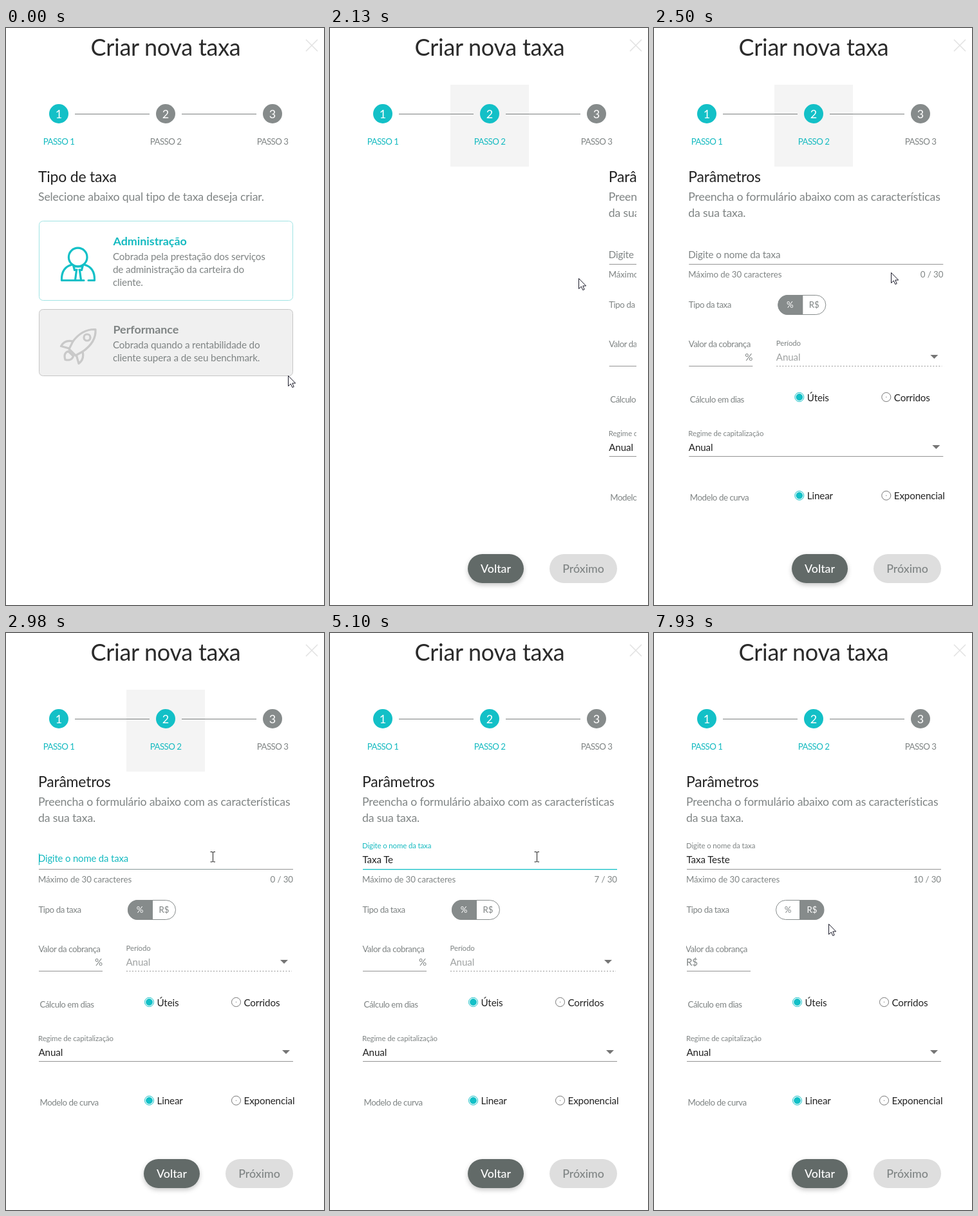
An HTML page for the animation above (8000 ms loop, 494 px wide and 895 px high).

```html
<!DOCTYPE html>
<html lang="pt-BR">
<head>
<meta charset="utf-8">
<title>Criar nova taxa</title>
<style>
  html, body { margin: 0; width: 100%; height: 100%; overflow: hidden; background: #fff; }
  svg { display: block; font-family: Lato, sans-serif; }
  text { white-space: pre; fill: #7f8484; font-size: 15.2px; letter-spacing: -.14px; }
  .title { font-size: 36px; letter-spacing: -.28px; fill: #2b2b2b; }
  .head { font-size: 23px; letter-spacing: -.22px; fill: #222; }
  .sub { font-size: 17.7px; letter-spacing: -.16px; }
  .small { font-size: 13.3px; letter-spacing: -.08px; }
  .tight { font-size: 13.3px; letter-spacing: -.45px; }
  .tiny { font-size: 11.4px; letter-spacing: -.08px; }
  .step { font-size: 13.3px; letter-spacing: -.55px; }
  .num { font-size: 18px; letter-spacing: 0; fill: #fff; }
  .dark { fill: #222; }
  .pale { fill: #a0a3a3; }
  .card { font-size: 17.9px; font-weight: 700; letter-spacing: -.04px; }
  .btn { font-size: 17.8px; font-weight: 500; letter-spacing: 0; }
  .mid { text-anchor: middle; }
  .end { text-anchor: end; }
  .teal { fill: #14bac0; }
  .white { fill: #fff; }
  .icon { fill: none; stroke-width: 3.2; stroke-linecap: round; stroke-linejoin: round; }
</style>
</head>
<body>
<svg id="stage" width="494" height="895" viewBox="0 0 494 895">
  <defs>
    <clipPath id="page"><rect x="50" y="200" width="426" height="600"/></clipPath>
    <filter id="shadow" x="-20%" y="-20%" width="140%" height="170%">
      <feDropShadow dx="0" dy="3" stdDeviation="3.5" flood-opacity=".22"/>
    </filter>
  </defs>
</svg>
<script>
const NS = 'http://www.w3.org/2000/svg';
const TEAL = '#13c0c7', GRAY = '#868b8b', LOOP = 8000, LEFT = 50;
const stage = document.getElementById('stage');

function el(parent, tag, attrs = {}, content = '') {
  const node = document.createElementNS(NS, tag);
  for (const k in attrs) node.setAttribute(k, attrs[k]);
  node.textContent = content;
  return parent.appendChild(node);
}
const group = (parent, attrs) => el(parent, 'g', attrs);
const text = (p, x, y, cls, s) => el(p, 'text', { x, y, class: cls }, s);
const rect = (p, x, y, width, height, fill, more) => el(p, 'rect', { x, y, width, height, fill, ...more });
const circle = (p, cx, cy, r, fill, more) => el(p, 'circle', { cx, cy, r, fill, ...more });
const path = (p, d, attrs) => el(p, 'path', { d, ...attrs });
const show = (node, on) => node.setAttribute('visibility', on ? 'visible' : 'hidden');
const fade = (node, v) => node.setAttribute('opacity', v);

// Header and stepper
text(stage, 248, 43, 'title mid', 'Criar nova taxa');
path(stage, 'M466 18L484 36M484 18L466 36', { stroke: '#e2e2e2', 'stroke-width': 1.6 });
const glow = rect(stage, 187, 88, 122, 127, '#f4f4f4');
for (const x of [107, 273]) rect(stage, x, 133, 116, 1, '#7c8080');
const steps = [82, 248, 414].map((x, i) => {
  const dot = circle(stage, x, 133, 15, GRAY);
  text(stage, x, 139.5, 'num mid', i + 1);
  return { dot, label: text(stage, x, 181, 'step mid', 'PASSO ' + (i + 1)) };
});
function lightStep(i, on) {
  steps[i].dot.setAttribute('fill', on ? TEAL : GRAY);
  steps[i].label.setAttribute('class', 'step mid' + (on ? ' teal' : ''));
}
lightStep(0, true);

// First page: fee type cards
const first = group(stage);
text(first, LEFT, 239, 'head', 'Tipo de taxa');
text(first, LEFT, 268, 'sub', 'Selecione abaixo qual tipo de taxa deseja criar.');
function card(y, h, fill, stroke, cls, name, lines) {
  rect(first, 51.5, y + .5, 394, h, fill, { rx: 6, stroke });
  text(first, 166.5, y + 38, 'card ' + cls, name);
  lines.forEach((s, i) => text(first, 166, y + 61 + i * 20, '', s));
}
card(299, 123, '#fff', '#a0e4e4', 'teal', 'Administração',
  ['Cobrada pela prestação dos serviços', 'de administração da carteira do', 'cliente.']);
card(436, 103, '#f0f0f0', '#c6c6c6', '', 'Performance',
  ['Cobrada quando a rentabilidade do', 'cliente supera a de seu benchmark.']);

const person = group(first, { class: 'icon', stroke: TEAL });
circle(person, 111.7, 355.5, 14.3, 'none');
path(person, 'M121 391.500H86.500C86 378 92 369.500 103 367M121 367C132 369.500 138 378 137.500 391.500H128');
path(person, 'M104.500 368L106.500 375.500L110 375M119.500 368L117.500 375.500L114 375M107 370H117M109.500 376L107.500 391M114.500 376L116.500 391');
const rocket = group(first, { class: 'icon', stroke: '#c9c9c9' });
path(rocket, 'M139 467.500C124 467 113 474 104 486L98 498L108 508L119 502C132 493 140 482 139 467.500Z');
path(rocket, 'M104 486C95 484 89 487 85.500 493.500L98 497M119 502C121 510 119 516 113 520.500L109.500 508');
path(rocket, 'M97 501.500C91 503 90 508 92 514.500C98 516 103 514 104.500 509Z');
circle(rocket, 126, 480, 5, 'none');

// Second page: form
const second = group(stage, { 'clip-path': 'url(#page)' });
const form = group(second);
text(form, LEFT, 239, 'head', 'Parâmetros');
text(form, LEFT, 268, 'sub', 'Preencha o formulário abaixo com as características');
text(form, LEFT, 293, 'sub', 'da sua taxa.');

const line = (p, x, y, w) => rect(p, x, y, w, 1, '#949494');
const arrowDown = (p, x, y) => path(p, `M${x - 6} ${y}h12l-6 6z`, { fill: '#757575' });

const label = text(form, 0, 0, '', 'Digite o nome da taxa');
const value = text(form, 50.5, 357, 'dark', '');
const caret = rect(form, 51, 342, 1, 18, '#13b6bd');
line(form, 51, 366, 395);
const focusLine = rect(form, 51, 366, 395, 1.3, TEAL);
text(form, LEFT, 387, 'small', 'Máximo de 30 caracteres');
const counter = text(form, 446, 387, 'small end', '');

text(form, 50.5, 434, 'tight', 'Tipo da taxa');
const picked = path(form, '', { fill: GRAY });
rect(form, 189.5, 414.5, 74, 30, 'none', { rx: 15, stroke: GRAY });
const percentTab = text(form, 208, 434, '', '%');
const moneyTab = text(form, 245.5, 434, '', 'R$');

const amountLabel = text(form, 50.5, 495, 'tight', 'Valor da cobrança');
const percent = text(form, 150, 516, 'end', '%');
const money = text(form, LEFT, 516, '', 'R$');
line(form, 51, 524, 99);
const period = group(form);
text(period, 186.5, 493, 'tiny', 'Período');
text(period, 186.5, 516, 'pale', 'Anual');
arrowDown(period, 432, 507);
path(period, 'M187 524.500H444', { stroke: '#969696', 'stroke-dasharray': '2 2.500' });

function radios(y, caption, a, b) {
  text(form, 52.5, y + 8, 'tight', caption);
  circle(form, 222.5, y, 7, '#fff', { stroke: TEAL });
  circle(form, 222.5, y, 5.4, TEAL);
  text(form, 234.5, y + 6, 'dark', a);
  circle(form, 357.5, y, 7, '#fff', { stroke: '#777' });
  circle(form, 357.5, y, .7, '#888');
  text(form, 369.5, y + 6, 'dark', b);
}
radios(572.5, 'Cálculo em dias', 'Úteis', 'Corridos');
text(form, LEFT, 633, 'tiny', 'Regime de capitalização');
text(form, 50.5, 656, 'dark', 'Anual');
arrowDown(form, 435, 647);
line(form, 51, 664, 395);
radios(725.2, 'Modelo de curva', 'Linear', 'Exponencial');

const buttons = group(stage);
rect(buttons, 214, 816, 87, 45, '#626a68', { rx: 22.5, filter: 'url(#shadow)' });
text(buttons, 257.5, 845, 'btn mid white', 'Voltar');
rect(buttons, 341, 816, 105, 45, '#dedede', { rx: 22.5 });
text(buttons, 393.5, 845, 'btn mid', 'Próximo');

// Pointer shapes, hotspot at 0,0
const pointer = group(stage);
const ink = { fill: '#fff', stroke: '#1c1c2b', 'stroke-linejoin': 'round' };
const shapes = {
  arrow: path(pointer, 'M.5 .5V16.500L4.300 13L6.800 18.500L9.200 17.500L6.800 12H11.700Z', ink),
  hand: path(pointer, 'M-1.500 14V2Q-1.500 .5 0 .5T1.500 2V8Q1.500 6.500 3.200 6.700T4.800 8.500Q5 7.300 6.500 7.600T8 9.500Q8.300 8.600 9.700 9T11 11V16Q11 19 9 22.500H0L-4 16.500Q-6 14 -5 12.600T-1.500 14ZM1.500 8V12M4.800 8.500V12M8 9.500V12', ink),
  beam: path(pointer, 'M-3.500 -7.500H-1Q.5 -7.500 .5 -6Q.5 -7.500 2 -7.500H4M.5 -6V6.500M-3.500 8H-1Q.5 8 .5 6.500Q.5 8 2 8H4', { fill: 'none', stroke: '#222' })
};

// time, x, y, shape from then on
const track = [
  [0, 438, 539, 'arrow'], [40, 438, 539, 'hand'], [130, 310, 508, 'hand'], [230, 166, 553, 'arrow'],
  [980, 166, 553, 'arrow'], [1100, 230, 530, 'hand'], [1250, 345, 496, 'hand'],
  [1390, 412, 428, 'hand'], [1500, 386, 388, 'hand'], [1960, 386, 388, 'arrow'],
  [2330, 386, 388, 'arrow'], [2500, 368, 379, 'arrow'], [2640, 352, 366, 'beam'],
  [2750, 342, 357, 'beam'], [2940, 321, 347, 'beam'], [6340, 321, 347, 'beam'],
  [6430, 322, 366, 'arrow'], [6550, 300, 411, 'arrow'], [6700, 284, 440, 'arrow'],
  [6930, 281, 448, 'arrow'], [7090, 281, 448, 'arrow'], [7230, 248, 432, 'hand'],
  [7400, 248, 432, 'hand'], [7450, 262, 442, 'arrow'], [7550, 285, 455, 'arrow'],
  [7870, 285, 455, 'arrow'], [7930, 271, 451, 'arrow'], [LOOP, 271, 451, 'arrow']
];
const keys = [3820, 4050, 4300, 4540, 4620, 4930, 5100, 5340, 5420, 5570];
const PICK = 1960, SLIDE = 2047, FOCUS = 2970, BLUR = 7300, BLINK = 3520;

const clamp = v => Math.min(1, Math.max(0, v));
function bezier(x1, y1, x2, y2) {
  const at = (a, b, s) => 3 * a * s * (1 - s) ** 2 + 3 * b * s * s * (1 - s) + s ** 3;
  return x => {
    let lo = 0, hi = 1;
    for (let i = 0; i < 24; i++) {
      const s = (lo + hi) / 2;
      if (at(x1, x2, s) < x) lo = s; else hi = s;
    }
    return at(y1, y2, hi);
  };
}
const slideEase = bezier(.35, 0, .25, 1), fieldEase = bezier(.25, .8, .25, 1);
const part = (t, from, length) => clamp((t - from) / length);

function movePointer(t) {
  let i = 0;
  while (i < track.length - 2 && track[i + 1][0] <= t) i++;
  const [t0, x0, y0, kind] = track[i], [t1, x1, y1] = track[i + 1];
  const k = (t - t0) / (t1 - t0);
  pointer.setAttribute('transform', `translate(${Math.round(x0 + (x1 - x0) * k)} ${Math.round(y0 + (y1 - y0) * k)})`);
  for (const name in shapes) show(shapes[name], name === kind);
}

function drawField(t) {
  const focused = t >= FOCUS && t < BLUR;
  const up = fieldEase(part(t, FOCUS, 400));
  label.setAttribute('transform', `translate(${LEFT} ${357 - 23 * up}) scale(${1 - .25 * up})`);
  label.setAttribute('class', focused ? 'teal' : '');
  const grow = .5 + .5 * fieldEase(part(t, FOCUS, 300));
  focusLine.setAttribute('x', 248.5 - 197.5 * grow);
  focusLine.setAttribute('width', 395 * grow);
  fade(focusLine, part(t, FOCUS, 150) - part(t, BLUR, 200));

  const count = keys.filter(k => k <= t).length;
  value.textContent = 'Taxa Teste'.slice(0, count);
  counter.textContent = count + ' / 30';
  const lit = t < BLINK || Math.floor((t - BLINK) / 530) % 2 === 1;
  const caretOn = focused && lit;
  show(caret, caretOn);
  if (caretOn) caret.setAttribute('x', Math.round(50.5 + (count ? value.getComputedTextLength() : 0)));
}

function drawToggle(inMoney) {
  picked.setAttribute('d', inMoney ? 'M226 414H249a15.500 15.500 0 0 1 0 31H226Z' : 'M228 414H204.500a15.500 15.500 0 0 0 0 31H228Z');
  percentTab.setAttribute('class', 'small mid' + (inMoney ? '' : ' white'));
  moneyTab.setAttribute('class', 'small mid' + (inMoney ? ' white' : ''));
  amountLabel.setAttribute('x', inMoney ? 49 : 50.5);
  percent.style.display = period.style.display = inMoney ? 'none' : '';
  money.style.display = inMoney ? '' : 'none';
}

function draw(t) {
  const onForm = t >= PICK;
  first.style.display = onForm ? 'none' : '';
  second.style.display = buttons.style.display = onForm ? '' : 'none';
  lightStep(1, onForm);
  fade(glow, part(t, PICK, 80) - part(t, FOCUS, 150));
  form.setAttribute('transform', `translate(${426 * (1 - slideEase(part(t, SLIDE, 510)))} 0)`);
  drawField(t);
  drawToggle(t >= BLUR);
  movePointer(t);
}

const start = performance.now();
function tick() {
  draw((performance.now() - start) % LOOP);
  requestAnimationFrame(tick);
}
tick();
</script>
</body>
</html>
```
